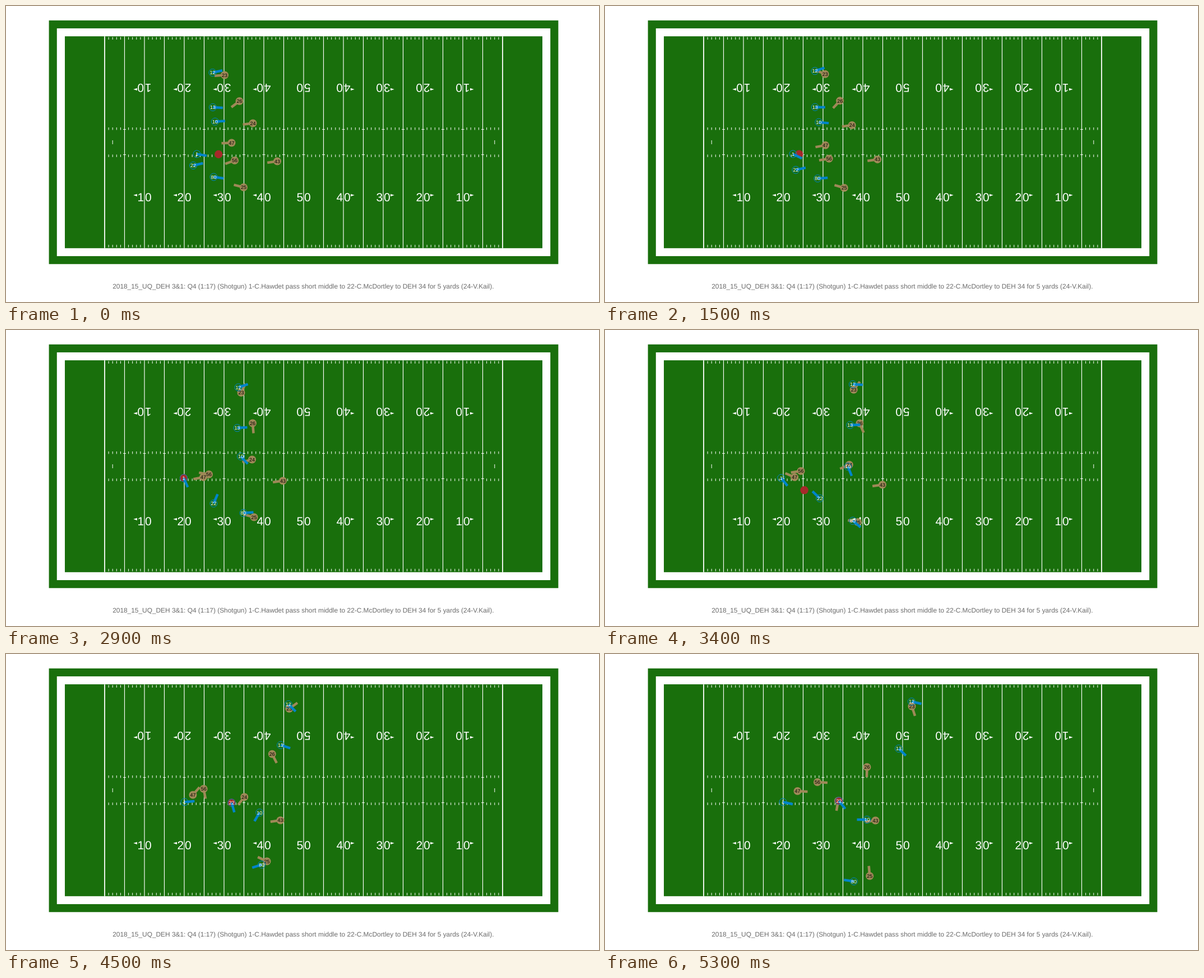
These frames come from a looping animation (1058x529 px, 5400 ms). An HTML page:

```html
<!DOCTYPE html>
<html lang="en">
<head>
<meta charset="utf-8">
<title>Play replay</title>
<style>
html, body { margin: 0; width: 100%; height: 100%; overflow: hidden; background: #fff; }
svg { display: block; width: 100%; height: 100%; }
text { font-family: "Liberation Sans", Arial, sans-serif; text-anchor: middle; text-rendering: geometricPrecision; }
.yards { font-size: 21px; letter-spacing: 1.8px; fill: #fff; }
.num { font-size: 9px; }
.note { font-size: 11.9px; fill: #6b6b6b; }
</style>
</head>
<body>
<svg viewBox="0 0 1058 529">
  <g id="field"></g>
  <g id="defence"></g>
  <circle id="ball" r="7.2" fill="#a52a2a"/>
  <g id="offence"></g>
  <text class="note" x="530.3" y="505">2018_15_UQ_DEH 3&amp;1: Q4 (1:17) (Shotgun) 1-C.Hawdet pass short middle to 22-C.McDortley to DEH 34 for 5 yards (24-V.Kail).</text>
</svg>
<script>
const LOOP = 5400, STEP = 100, BAR = 18;
const YARD = 7.1, CX = 531, CY = 243.5, DEPTH = YARD * 80 / 3;
const GREEN = '#196f0c', BLUE = '#0085ca', GOLD = '#9f8958';
const $ = id => document.getElementById(id);
const yardX = yd => CX + (yd - 50) * YARD;

function add(parent, tag, attrs, text = '') {
  const el = document.createElementNS('http://www.w3.org/2000/svg', tag);
  for (const k in attrs) el.setAttribute(k, attrs[k]);
  el.textContent = text;
  parent.append(el);
  return el;
}

function drawField() {
  const field = $('field');
  for (const [margin, fill] of [[4, GREEN], [2, '#fff'], [0, GREEN]]) {
    const w = (60 + margin) * YARD, h = DEPTH + margin * YARD;
    add(field, 'rect', { x: CX - w, y: CY - h, width: 2 * w, height: 2 * h, fill });
  }

  const full = yd => `M${yardX(yd)} ${CY - DEPTH}v${2 * DEPTH}`;
  let ticks = '', lines = '';
  for (let yd = 1; yd < 100; yd++) {
    const x = yardX(yd);
    if (yd % 5) {
      for (const y of [55.5, 217, 265.5, 426.8]) ticks += `M${x} ${y}v4.5`;
    } else {
      lines += full(yd);
      for (const y of [220.6, 265.7]) ticks += `M${x - 2.5} ${y}h5`;
    }
  }
  for (const yd of [2, 98]) ticks += `M${yardX(yd)} 240v7`;
  for (const [d, w] of [[ticks, 1], [lines, 1.15], [full(0) + full(100), 1.8]])
    add(field, 'path', { d, stroke: '#fff', 'stroke-width': w });

  // The far side is the near side turned half round
  for (const turn of [0, 180]) {
    const side = add(field, 'g', { transform: `rotate(${turn} ${CX} ${CY})` });
    for (let yd = 10; yd < 100; yd += 10) {
      const x = yardX(yd), dir = Math.sign(yd - 50);
      add(side, 'text', { class: 'yards', x: x + 0.9, y: 348.5 }, 50 - Math.abs(yd - 50));
      if (dir) add(side, 'path', { fill: '#fff', d: `M${x + dir * 13} 336v4.2l${dir * 6.8} -2.1z` });
    }
  }
}

// Play clock: slow before the snap, 0 at the throw, 1 at the catch
const THROW = 2900, BEAT = 900;
const clock = t => t < THROW ? (t / THROW) ** 3 - 1 : (t - THROW) / BEAT;
const KEYS = [0, THROW, 3800, 5300].map(clock);

// Polynomial through the values at the first KEYS
const curve = values => u => values.reduce((sum, v, i) =>
  sum + values.reduce((p, _, j) => j === i ? p : p * (u - KEYS[j]) / (KEYS[i] - KEYS[j]), v), 0);

const players = {};

function player(team, num, ...route) {
  const attack = team === 'offence', color = attack ? BLUE : GOLD;
  const [bars, dots, nums] = $(team).children;
  players[num] = {
    route: route.map(curve),
    bar: add(bars, 'path', { d: `M0 0H${BAR}`, stroke: color, 'stroke-width': 4.5 }),
    dot: add(dots, 'circle', attack ? { r: 6.5, fill: 'none', stroke: color } : { r: 7, fill: color }),
    label: add(nums, 'text', { class: 'num', y: 3.2, fill: attack ? '#fff' : '#000' }, num),
  };
}

// Routes: x, y and facing at the start, throw, catch and end
function lineUp() {
  for (const team of ['defence', 'offence'])
    for (let i = 0; i < 3; i++) add($(team), 'g', {});
  const off = (...a) => player('offence', ...a);
  const def = (...a) => player('defence', ...a);

  off(12, [368.5, 414.5, 464.5, 547], [119, 102.5, 94, 85], [-12, -18, 23, 13]);
  off(13, [369, 412.5, 457, 524], [181, 175, 166, 169], [3, -3, 4]);
  off(10, [373, 419, 441.5, 467.5], [206.5, 226, 259.5, 296], [-3, 47, 85, 180]);
  off(1, [340.5, 317, 315, 317.5], [264.5], [10, 66, 29, 13]);
  off(22, [334, 370.5, 391, 417.5], [285, 310, 288, 262.5], [-13, -67, -197, -308]);
  off(80, [370.5, 423.5, 451.5, 444], [305.5, 327, 353], [8, -4, 86, 188]);
  def(23, [390, 419.5, 465.5, 547.5], [123.5, 112, 103], [176, 295, 308, 432]);
  def(26, [416.5, 440, 464.5, 467.5], [170, 166.5, 169, 202], [143, 85, 60]);
  def(24, [440.5, 439, 432.5, 416], [209.5, 231.5, 247, 262.5], [173, 165, 148]);
  def(56, [408, 362, 346, 379], [276, 258, 248, 229], [160, 190, 143, 3]);
  def(47, [402.5, 352, 333, 343.5], [244.5, 263, 260, 245], [178, 169, 241, 363]);
  def(43, [484, 494, 494, 482.5], [277.5, 269.5, 284.5, 297.5], [172]);
  def(25, [424, 442.5, 457], [324, 334.5, 352], [194, 195, 190, 265]);
}

const ramp = (t, from, to) => Math.min(1, Math.max(0, (t - from) / (to - from)));
const mix = (a, b, k) => a.map((v, i) => v + (b[i] - v) * k);

// The ball is snapped to the passer, then thrown to the receiver
function ballAt(t, passer, receiver) {
  const held = mix([379.2, 265], passer, ramp(t, 1200, 1600));
  return mix(held, receiver, ramp(t, 3100, 3600));
}

function render(now) {
  const t = Math.floor((now % LOOP) / STEP) * STEP, u = clock(t);
  for (const p of Object.values(players)) {
    const [x, y, angle] = p.route.map(f => f(u));
    const move = `translate(${x} ${y})`;
    p.at = [x, y];
    p.bar.setAttribute('transform', `${move} rotate(${angle})`);
    p.dot.setAttribute('transform', move);
    p.label.setAttribute('transform', move);
  }
  $('ball').setAttribute('transform', `translate(${ballAt(t, players[1].at, players[22].at)})`);
}

drawField();
lineUp();
render(0);
let start;
requestAnimationFrame(function tick(now) {
  start ??= now;
  render(now - start);
  requestAnimationFrame(tick);
});
</script>
</body>
</html>
```
